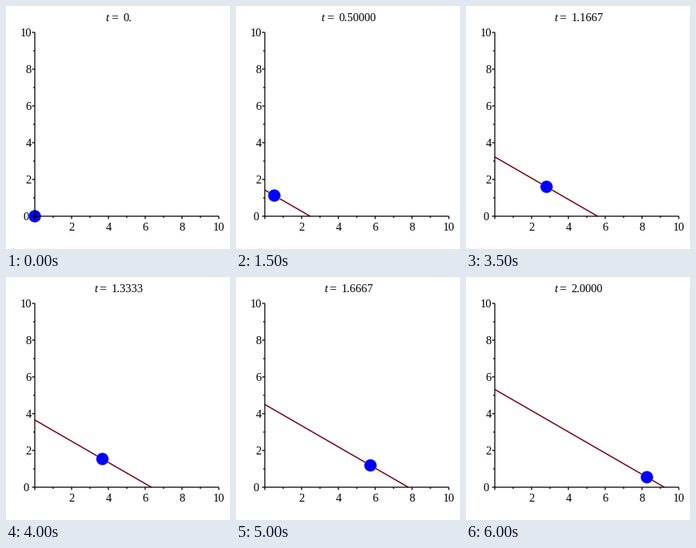
A matplotlib script for the animation above (6.25 s loop, 280 by 304 pixels).

```python
import math

import matplotlib.pyplot as plt
from matplotlib.animation import FuncAnimation
from matplotlib.patches import Circle

W, H, DPI = 280, 304, 64
PX = 72 / DPI                     # points per pixel
X0, Y0, UNIT = 36, 263, 23        # plot origin and scale in pixels
FRAMES, STEP = 25, 250
SLOPE = math.tan(math.radians(30))
FONT = dict(family="Liberation Serif", size=14.5 * PX, color="black")

fig = plt.figure(figsize=(W / DPI, H / DPI), dpi=DPI, facecolor="white")
ax = fig.add_axes([0, 0, 1, 1])
ax.set(xlim=(0, W), ylim=(H, 0))
ax.axis("off")


def to_px(x, y):
    return X0 + UNIT * x, Y0 - UNIT * y


def stroke(xs, ys):
    # Unsnapped, so the lines straddle two pixels softly.
    ax.plot(xs, ys, color="black", lw=1.25 * PX, solid_capstyle="butt",
            snap=False, zorder=4)


def label(x, y, text, ha="left", **kw):
    return ax.text(x, y, text, ha=ha, va="baseline", **{**FONT, **kw})


def draw_axes():
    stroke([X0, X0], [33, Y0])
    stroke([X0, 266], [Y0, Y0])
    for n in range(11):
        size = 2 if n % 2 else 3.5
        x, y = to_px(n, n)
        stroke([x, x], [Y0, Y0 + size])
        stroke([X0 - size, X0], [y, y])
        if n % 2 == 0:
            label(32 if n else 29, y + 5, str(n), ha="right")
            if n:
                label(x, 281, str(n), ha="center")


def wire_height(t):
    return 2.91 * t - 0.125 * t * t


def title_number(t):
    if t == 0:
        return "0."
    return f"{t:.{4 - math.floor(math.log10(t))}f}"


draw_axes()
wire, = ax.plot([], [], color="#78000e", lw=1.5 * PX,
                solid_capstyle="butt", zorder=2)
halo = ax.add_patch(Circle((0, 0), 8, fc="#8080ff", ec="none", zorder=3))
bead = ax.add_patch(Circle((0, 0), 7.4, fc="#0000ff", ec="none", zorder=3))
title = [label(0, 19, "t", style="italic"),
         label(0, 19, "=", size=16 * PX), label(0, 19, "")]


def update(i):
    t = i / 12
    c = wire_height(t)
    x = 2.067 * t * t
    wire.set_data(*zip(to_px(0, c), to_px(c / SLOPE, 0)))
    for disc in (halo, bead):
        disc.center = to_px(x, c - x * SLOPE)

    text = title_number(t)
    title[2].set_text(text)
    left = 140.8 - (21.8 + 7.25 * (len(text) - 0.5)) / 2
    for part, dx in zip(title, (0, 6.5, 21.8)):
        part.set_x(left + dx)
    return [wire, halo, bead, *title]


anim = FuncAnimation(fig, update, frames=FRAMES, interval=STEP,
                     repeat=True, repeat_delay=0, blit=False)
plt.show()
```
